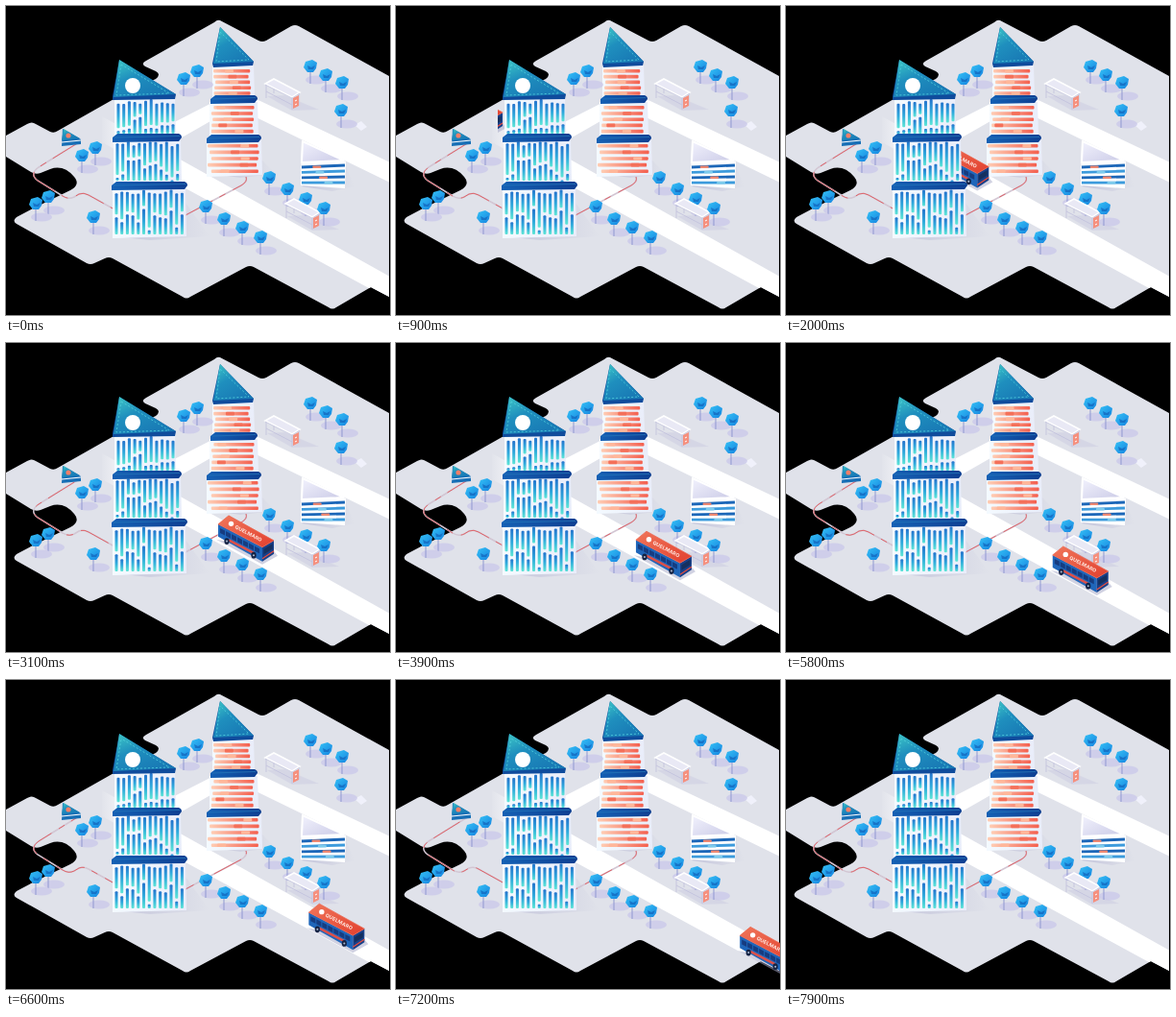
An HTML page for the animation above (8000 ms loop, 400 px wide and 322 px high).

```html
<!DOCTYPE html>
<html lang="en">
<head>
<meta charset="utf-8">
<title>Isometric city</title>
<style>
html, body { margin: 0; width: 100%; height: 100%; overflow: hidden; background: #000; }
svg { display: block; width: 100%; height: 100%; }
text { font: bold 5.8px Inter, Arial, sans-serif; fill: #ffe9e2; }
</style>
</head>
<body>
<svg id="stage" viewBox="0 0 400 322">
  <defs>
    <linearGradient id="roof" x1="0" y1="0" x2=".7" y2="1">
      <stop stop-color="#3fc9c6"/><stop offset=".45" stop-color="#1f8fbe"/><stop offset="1" stop-color="#1878b4"/>
    </linearGradient>
    <linearGradient id="ledge"><stop stop-color="#1460b4"/><stop offset="1" stop-color="#0e3f92"/></linearGradient>
    <linearGradient id="wall"><stop stop-color="#f4faff"/><stop offset="1" stop-color="#e9edfa"/></linearGradient>
    <linearGradient id="cool" x2="0" y2="1">
      <stop stop-color="#2472cc"/><stop offset=".5" stop-color="#2fa9dc"/><stop offset="1" stop-color="#5ee6d6"/>
    </linearGradient>
    <linearGradient id="warm"><stop stop-color="#ffcdb4"/><stop offset="1" stop-color="#f4604f"/></linearGradient>
    <linearGradient id="leaf" x2="1" y2="1"><stop stop-color="#35c2f6"/><stop offset="1" stop-color="#1684e0"/></linearGradient>
    <linearGradient id="paint" x2="1" y2="1"><stop stop-color="#f0765a"/><stop offset="1" stop-color="#e2402f"/></linearGradient>
    <linearGradient id="hollow" y2="1"><stop stop-color="#f2f2fd"/><stop offset="1" stop-color="#cacae6"/></linearGradient>
    <linearGradient id="road" gradientUnits="userSpaceOnUse" x1="98" x2="135"><stop stop-color="#e0e2ea"/><stop offset="1" stop-color="#fff"/></linearGradient>
    <linearGradient id="shade"><stop stop-color="#a9a9cd" stop-opacity=".5"/><stop offset="1" stop-color="#a9a9cd" stop-opacity="0"/></linearGradient>
    <clipPath id="land"><path id="outline" d="M223 15L263 36Q267 38 271 36L297 21Q301 19 305 21L399 73V303L380 293L344 314Q340 317 336 314L258 272Q254 270 250 272L192 303Q188 306 184 303L111 263Q107 261 103 263L92 268Q88 270 84 268L11 227Q6 224 11 220L28 211L67 192Q78 186 71 178Q60 165 46 170L36 174Q31 176 26 173L0 157V135L22 123Q27 120 31 123L46 131Q50 133 54 130L114 96L156 76Q162 71 156 68L145 63Q140 60 146 57L217 17Q220 14 223 15Z"/></clipPath>
    <clipPath id="visible"><path d="M106 0H400V322H106Z"/></clipPath>
  </defs>
  <use href="#outline" fill="#e0e2ea"/>
  <g clip-path="url(#land)" fill="url(#road)">
    <path d="M100 115L187 163L400 282V306L378 294L187 190L100 142Z"/>
    <path d="M150 134L234 91Q241 87 248 91L400 163V184L244 108Q239 106 234 108L164 148Z"/>
  </g>
  <path d="M363 124L370 120L376 126L370 130Z" fill="#f0f1fb"/>
  <g id="routes" fill="none"></g>
  <g id="back"></g>
  <g id="bus" clip-path="url(#visible)"><g id="body"></g></g>
  <g id="front"></g>
</svg>
<script>
const $ = id => document.getElementById(id);
const add = (id, s) => $(id).insertAdjacentHTML('beforeend', s);
const poly = (pts, fill, extra = '') => `<polygon points="${pts}" fill="${fill}" ${extra}/>`;
const line = (d, color, w = 1, extra = '') =>
  `<path d="${d}" fill="none" stroke="${color}" stroke-width="${w}" ${extra}/>`;
const rect = (x, y, w, h, fill) =>
  `<rect x="${x}" y="${y}" width="${w}" height="${h}" rx="1" fill="${fill}"/>`;

let seed = 11;
const rnd = () => (seed = seed * 16807 % 2147483647) / 2147483647;

const tree = (x, y) => `<g transform="translate(${x} ${y})">
  <ellipse cx="6" cy="14" rx="11" ry="4.5" fill="#cac9ea" opacity=".8"/>
  ${line('M0 4V18', '#8f97d0')}
  <path d="M-5 -5L2 -7L7 -4L6 2L3 6L-3 6L-7 1Z" fill="url(#leaf)"/>
  <path d="M-3 -1L1 1L5 -1L3 3L-2 3Z" fill="#1263b9" opacity=".7"/></g>`;

const shelter = (x, y) => `<g transform="translate(${x} ${y})">
  <path d="M2 13L28 28L56 27L20 12Z" fill="#cbcbe2" opacity=".5"/>
  ${line('M1 1V15M9 -3V10M28 14V27M35 10V23M1 8L28 22', '#c3c3de', .9)}
  ${poly('0,0 9,-5 36,9 28,14', '#e9e9f5', 'stroke="#fff" stroke-width="1.6"')}
  ${line('M0 1L28 15L36 10', '#bfc0dc', .7)}
  ${poly('29,15 35,12 35,23 29,26', '#f5907e')}${line('M31 18L33 17M31 22L33 21', '#fff')}</g>`;

// Upright bars, each column broken at its own height
function coolWall(x, y, w, h) {
  let s = poly([x, y, x + w, y, x + w + 1, y + h - 2, x, y + h], 'url(#wall)');
  for (let i = 0; i < w / 5.7 - 1; i++) {
    const bx = x + 2.5 + i * 5.7, cut = h * (.25 + .45 * rnd()), top = y + 2 + rnd() * 5;
    s += rect(bx, top, 3, cut, 'url(#cool)');
    s += rect(bx, top + cut + 3, 3, Math.max(3, y + h - 4 - top - cut - 3), 'url(#cool)');
  }
  return s;
}

// Level bars with a brighter piece that drifts a little
function warmWall(x, y, w, h) {
  let s = poly([x, y, x + w, y, x + w + 1, y + h - 2, x, y + h], 'url(#wall)');
  for (let i = 0; i < 5; i++) {
    const by = y + 4 + i * (h - 5) / 5, a = rnd() * 4, len = w - 3 - a - rnd() * 4;
    s += rect(x + 1 + a, by, len, 3.6, 'url(#warm)');
    s += `<g class="drift">${rect(x + 7 + rnd() * (w - 24), by, 9, 3.6, i % 2 ? '#f4705a' : '#ffb79a')}</g>`;
  }
  return s;
}

const ledge = (x, y, w) =>
  `<path d="M${x} ${y}L${x + 5} ${y - 4}L${x + w - 3} ${y - 4}Q${x + w} ${y - 3} ${x + w} ${y}L${x + w - 3} ${y + 4}L${x} ${y + 5}Z" fill="url(#ledge)"/>` +
  line(`M${x + 2} ${y}L${x + w - 2} ${y - 1.5}`, '#2475b9', .8);

const dashed = d => line(d, '#54d4df', .8, 'class="trim" stroke-dasharray="2 2"');

// Glowing routes on the ground
const route = 'M76 142L34 168Q24 175 33 182L59 198Q65 202 71 199L76 196Q81 194 86 197L113 212';
const exit = 'M187 218L245 187Q252 183 250 178';
for (const d of [route, exit]) {
  add('routes', line(d, '#d3c6d3', 1.5));
  add('routes', line(d, '#e05a5e', .9, 'class="flow" stroke-dasharray="32 8 7 9"'));
}

// Far buildings, shelters and trees
add('back', poly('266,160 281,175 244,179 210,174', 'url(#shade)') +
  warmWall(215, 62, 43, 34) + warmWall(212, 100, 50, 36) + warmWall(209, 140, 57, 38) +
  ledge(213, 97, 49) + ledge(209, 138, 57) +
  poly('223,22 258,58 257,62 216,64 215,60', '#0f4b9c') +
  poly('223,22 258,58 216,60', 'url(#roof)') + dashed('M223 27L253 56L219 58Z'));
add('back', poly('353,164 363,188 340,193 308,188', 'url(#shade)') +
  poly('308,140 354,162 353,190 307,187', '#fff') +
  poly('309,141 352,161 308,163', 'url(#hollow)', 'stroke="#fff" stroke-width="2"') +
  [0, 1, 2, 3].map(i => line(`M308 ${168 + i * 5.4}L353 ${166 + i * 6}`, i % 2 ? '#3d9bdc' : '#1c67b8', 2.8) +
    `<g class="drift">${rect(318 + i * 5, 166.5 + i * 5.5, 9, 2.6, i % 2 ? '#7dcbec' : '#ef8871')}</g>`).join(''));
add('back', poly('59,128 78,139 78,144 58,146', '#176fb6') + poly('60,128 77,138 58,140', 'url(#roof)') +
  line('M58 142L78 140', '#fff', 1.2) + '<circle cx="65" cy="135" r="2.6" fill="#f37f69"/>');
add('back', shelter(270, 81));
[[199, 68], [185, 76], [317, 63], [333, 72], [350, 80], [349, 109], [93, 148], [79, 156],
 [274, 179], [293, 191], [312, 201]].forEach(p => add('back', tree(...p)));
add('back', shelter(291, 206) + tree(331, 211));

// Bus, drawn around its centre
const slope = x => -15 + (x + 29) * .522;
let bus = poly('-31,1 17,27 33,18 28,12', '#a4a5c6', 'opacity=".5"') +
  poly('-29,-15 17,9 17,24 -29,-2', '#1f66ba') + poly('17,9 29,2 29,16 17,24', '#17408a') +
  poly('18.5,11 27.5,5.5 27.5,11 18.5,16.5', '#15305f') +
  line('M-18 1.5L8 15', '#dd5048', 2.4) + line('M17 21L29 13', '#e84c3d', 1.2);
for (let x = -27; x < 15; x += 6)
  bus += poly([x, slope(x) + 3, x + 5, slope(x + 5) + 3, x + 5, slope(x + 5) + 8, x, slope(x) + 8], '#163c80');
for (const x of [-20, 8])
  bus += `<ellipse cx="${x}" cy="${slope(x) + 13}" rx="2.6" ry="3.4" fill="#152344"/><circle cx="${x}" cy="${slope(x) + 13}" r="1" fill="#aebbd2"/>`;
bus += poly('-29,-15 -18,-24 29,2 17,9', 'url(#paint)', 'stroke="#ec6048" stroke-width=".7" stroke-linejoin="round"') +
  '<circle cx="-15.5" cy="-15.5" r="2.7" fill="#fff"/>' +
  '<text transform="matrix(.82 .43 -.4 .8 -12 -11)">QUELMARO</text>';
add('body', bus);

// Near tower and trees
add('front', poly('187,205 212,240 150,244 112,240', 'url(#shade)') +
  coolWall(113, 95, 63, 42) + coolWall(112, 139, 70, 47) + coolWall(111, 189, 76, 53) +
  ledge(111, 137, 72) + ledge(110, 187, 79) +
  poly('118,56 177,92 176,97 111,98 111,94', '#0f4b9c') +
  poly('118,56 177,92 112,95', 'url(#roof)') + dashed('M120 61L170 91L115 93Z') +
  '<circle cx="132" cy="83" r="8" fill="#fff"/>');
[[44, 199], [31, 206], [91, 220], [208, 209], [227, 222], [246, 231], [265, 241]]
  .forEach(p => add('front', tree(...p)));

const each = (sel, fn) => document.querySelectorAll(sel).forEach(fn);
const STOP = 4.85;

function draw(now) {
  const t = now % 8000 / 1000, d = t - STOP;
  // Brake towards the shelter, then pull away
  const x = 291 + d * Math.abs(d) * (d < 0 ? 13.4 : 17.4);
  $('body').setAttribute('transform', `translate(${x} ${227 + (x - 291) * .565})`);
  each('.flow', e => e.setAttribute('stroke-dashoffset', -t * 56));
  each('.trim', e => e.setAttribute('stroke-dashoffset', -t * 4));
  each('.drift', (e, i) => e.setAttribute('transform', `translate(${2 * Math.sin(t * Math.PI / 2 + i)} 0)`));
  requestAnimationFrame(draw);
}
draw(performance.now());
</script>
</body>
</html>
```
